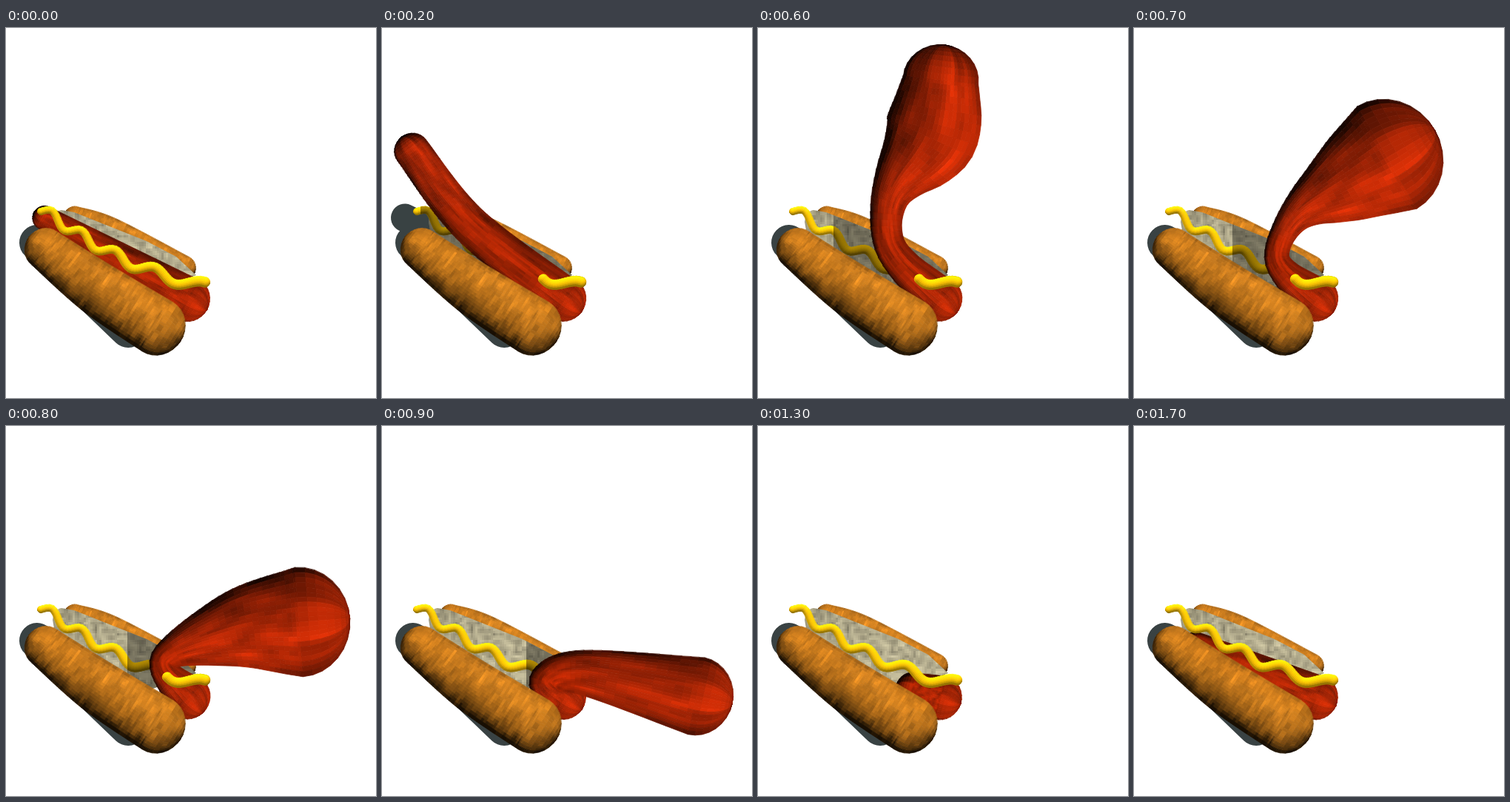
Recreate the animation shown at these times as an HTML page with a canvas. Size 500 px wide and 500 px high, loop 1800 ms.

```html
<!DOCTYPE html>
<html lang="en">
<head>
<meta charset="utf-8">
<title>Hot dog</title>
<style>
html, body { margin: 0; width: 100%; height: 100%; overflow: hidden; background: #fff; }
canvas { display: block; width: 500px; height: 500px; }
</style>
</head>
<body>
<canvas id="stage" width="500" height="500"></canvas>
<script>
const ctx = document.getElementById('stage').getContext('2d');
const LOOP = 1800, STEP = 100;

const mix = (a, b, k) => a + (b - a) * k;
const hash = (x, y) => { const h = Math.sin(x * 127.1 + y * 311.7) * 43758.5; return h - Math.floor(h); };

function noise(x, y) {
  const i = Math.floor(x), j = Math.floor(y), u = x - i, v = y - j;
  return mix(mix(hash(i, j), hash(i + 1, j), u), mix(hash(i, j + 1), hash(i + 1, j + 1), u), v);
}

// Catmull-Rom curve through [x, y, radius] points
function spline(points, parts) {
  const at = i => points[Math.max(0, Math.min(points.length - 1, i))];
  const curve = [];
  for (let i = 0; i < points.length - 1; i++) {
    for (let k = 0; k < parts; k++) {
      const t = k / parts;
      curve.push(at(i).map((b, d) => {
        const a = at(i - 1)[d], c = at(i + 1)[d], e = at(i + 2)[d];
        return b + t / 2 * (c - a + t * (2 * a - 5 * b + 4 * c - e + t * (3 * (b - c) + e - a)));
      }));
    }
  }
  curve.push(at(points.length));
  return curve;
}

// Cross-sections of a tube with rounded ends
function ringsOf(points, parts) {
  const curve = spline(points, parts), last = curve.length - 1, rings = [];
  const add = (i, angle, side) => {
    const [x, y, r] = curve[i], a = curve[Math.max(0, i - 1)], b = curve[Math.min(last, i + 1)];
    const d = Math.hypot(b[0] - a[0], b[1] - a[1]) || 1;
    const tx = (b[0] - a[0]) / d, ty = (b[1] - a[1]) / d;
    const out = side * Math.cos(angle), w = Math.sin(angle);
    rings.push({ x: x + tx * r * out * .93, y: y + ty * r * out * .93, tx, ty, out, w, r: r * w,
      s: i / last * 4 + out * .3 });
  };
  for (let k = 0; k < 8; k++) add(0, k / 8 * Math.PI / 2, -1);
  for (let i = 0; i <= last; i++) add(i, Math.PI / 2, 0);
  for (let k = 7; k >= 0; k--) add(last, k / 8 * Math.PI / 2, 1);
  return rings;
}

const SKINS = {
  sausage: { rgb: [190, 42, 6], light: [.35, .2], grain: [6, 2.2], rough: .65, strips: 22, parts: 3 },
  bun: { rgb: [212, 130, 32], light: [.1, -.4], grain: [3, 11], rough: .5, strips: 18, parts: 30 },
  mustard: { rgb: [255, 198, 8], light: [0, -.4], grain: [1, 1], rough: 0, strips: 6, parts: 2 }
};

function tube(points, { rgb, light, grain, rough, strips, parts }, dim = 1) {
  const rings = ringsOf(points, parts);
  const corner = (p, u) => [p.x - p.ty * p.r * u, p.y + p.tx * p.r * u];
  ctx.lineWidth = .8;
  for (let i = 0; i < rings.length - 1; i++) {
    const p = rings[i], q = rings[i + 1];
    for (let j = 0; j < strips; j++) {
      const u0 = -1 + 2 * j / strips, u1 = u0 + 2 / strips, u = (u0 + u1) / 2;
      const nx = -p.ty * u * p.w + p.tx * p.out, ny = p.tx * u * p.w + p.ty * p.out;
      const face = Math.sqrt(1 - u * u) * p.w;
      const gx = u * grain[0] + 20, gy = p.s * grain[1] + 9;
      const speck = noise(gx, gy) * .65 + noise(gx * 2.3, gy * 2.1) * .35 - .5;
      const glow = rough ? .28 + .62 * face : .8 + .22 * face;
      const shade = Math.max(.12, glow + nx * light[0] + ny * light[1] + speck * rough) * dim;
      ctx.fillStyle = ctx.strokeStyle = `rgb(${rgb.map(c => Math.min(255, c * shade | 0))})`;
      ctx.beginPath();
      for (const c of [corner(p, u0), corner(p, u1), corner(q, u1), corner(q, u0)]) ctx.lineTo(...c);
      ctx.closePath();
      ctx.fill();
      ctx.stroke();
    }
  }
}

const FRONT = [[52, 298, 28], [125, 353, 36], [205, 404, 39]];
const BACK = [[92, 256, 15], [140, 276, 20], [240, 325, 17]];
const CRUMB = new Path2D('M63 262Q65 247 75 246L92 249L190 288L230 309L257 334L190 358L110 304L66 279Z');

// Wavy line that sags a little and whose waves grow longer
const MUSTARD = Array.from({ length: 37 }, (_, i) => {
  const k = i / 36, wave = Math.cos(2 * Math.PI * (-.33 + 5.9 * k - 1.55 * k * k));
  return [48 + 219 * k + 2 * wave, 245 + 105 * k + 15 * Math.sin(Math.PI * k) - 6.5 * wave, 4.5 + 2.3 * k];
});
const TAIL = MUSTARD.slice(-9);

// Sausage: time, then [x, y, radius] points from the fixed end to the free one
const BASE = [247, 367, 30];
const POSES = [
  [0, [51, 256, 16]],
  [200, [118, 265, 26], [40, 165, 24]],
  [400, [145, 280, 26], [98, 140, 36], [84, 87, 32]],
  [500, [150, 240, 26], [155, 130, 48], [163, 63, 43]],
  [600, [181, 300, 21], [180, 225, 27], [232, 148, 63], [247, 70, 51]],
  [700, [194, 315, 17], [218, 254, 23], [283, 210, 56], [342, 175, 80]],
  [800, [213, 315, 18], [310, 275, 52], [396, 265, 74]],
  [900, [222, 345, 23], [270, 333, 30], [425, 365, 53]],
  [1000, [235, 357, 26], [388, 412, 50]],
  [1200, [254, 424, 28]],
  [1300, [207, 355, 22]],
  [1700, [82, 296, 18]]
];

const bend = points => spline([BASE, ...points], 12 / points.length);

function pose(t) {
  const n = Math.max(1, POSES.findIndex(p => p[0] >= t));
  const [t0, ...from] = POSES[n - 1], [t1, ...to] = POSES[n];
  const k = (t - t0) / (t1 - t0), goal = bend(to);
  return bend(from).map((p, i) => p.map((v, d) => mix(v, goal[i][d], k)));
}

function clipped(path, paint) {
  ctx.save();
  ctx.clip(path);
  paint();
  ctx.restore();
}

function crumb() {
  clipped(CRUMB, () => {
    for (let x = 60; x < 260; x += 3) {
      for (let y = 244; y < 360; y += 3) {
        const v = 135 + 75 * noise(x / 5, y / 5) + (x - 150) * .12;
        ctx.fillStyle = `rgb(${v | 0},${v * .96 | 0},${v * .79 | 0})`;
        ctx.fillRect(x, y, 3, 3);
      }
    }
  });
}

function groundLine(x0, y0, x1, y1, width) {
  ctx.strokeStyle = '#394243';
  ctx.lineCap = 'round';
  ctx.lineWidth = width;
  ctx.beginPath();
  ctx.moveTo(x0, y0);
  ctx.lineTo(x1, y1);
  ctx.stroke();
}

function draw(t) {
  const lifted = t > 0 && t < 1000;
  const shadowX = Math.max(52, 40 + (t - 400) * .31);
  ctx.fillStyle = '#fff';
  ctx.fillRect(0, 0, 500, 500);
  groundLine(42, 290, 165, 408, 48);
  if (lifted && t < 600) {
    const x = t < 400 ? 27 + t / 50 : 36 + (t - 400) * .3;
    groundLine(x, 259 + (x - 36) * .5, 100, 290, 38);
  }
  tube(BACK, SKINS.bun);
  crumb();
  if (lifted) {
    tube(MUSTARD, SKINS.mustard);
    const shaded = new Path2D();
    shaded.rect(shadowX, 200, 300, 200);
    clipped(shaded, () => {
      clipped(CRUMB, () => {
        ctx.fillStyle = 'rgba(20,22,18,.4)';
        ctx.fillRect(0, 200, 260, 200);
      });
      tube(MUSTARD, SKINS.mustard, .56);
    });
  }
  tube(pose(t), SKINS.sausage);
  if (!lifted) tube(MUSTARD, SKINS.mustard);
  else if (t < 900) tube(TAIL, SKINS.mustard);
  tube(FRONT, SKINS.bun);
}

let shown = -1;
const start = performance.now();
function tick() {
  const t = Math.floor((performance.now() - start) % LOOP / STEP) * STEP;
  if (t !== shown) draw(shown = t);
  requestAnimationFrame(tick);
}
tick();
</script>
</body>
</html>
```
